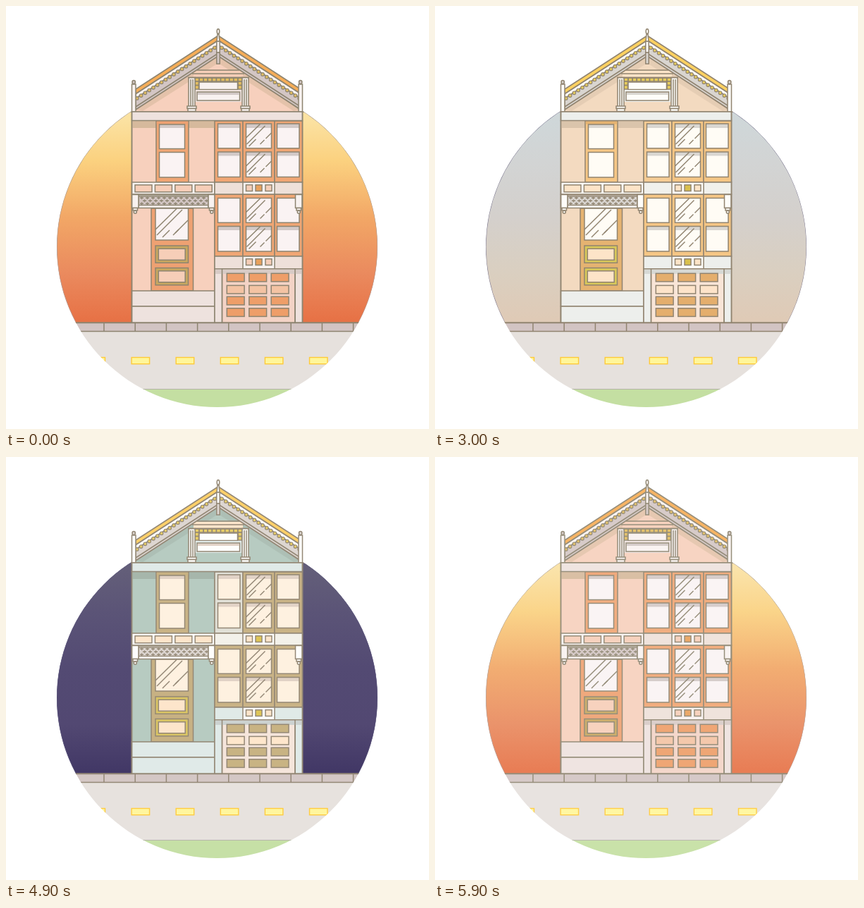
Write an HTML page with a canvas that moves like this. It is 600 px wide and 600 px high and loops after 6000 ms.

```html
<!DOCTYPE html>
<html lang="en">
<head>
<meta charset="utf-8">
<title>House from sunset to night</title>
<style>
html, body { margin: 0; width: 100%; height: 100%; overflow: hidden; background: #fff; }
canvas { display: block; width: 600px; height: 600px; }
</style>
</head>
<body>
<canvas width="600" height="600"></canvas>
<script>
const ctx = document.querySelector('canvas').getContext('2d');

// Each entry: sunset, day, night.
const palette = {
  sky0: ['fbe2a2', 'dde6e5', '555071'],
  sky1: ['fbd17f', 'e1e4df', '4c4670'],
  sky2: ['f2a766', 'e4e0d6', '443d6d'],
  sky3: ['ea8a5e', 'ebdfc9', '433c6c'],
  sky4: ['e77246', 'f2dbbf', '322c61'],
  rim: ['a8a0a0', '8f8ba0', '544f78'],
  line: ['8d8470', '918470', '8f8370'],
  wall: ['f7d0bd', 'fadcc0', 'b1c8be'],
  wallShade: ['d6b99c', 'e0c6ab', 'a0b2a8'],
  trim: ['eee2de', 'eff0ec', 'dee9e7'],
  belt: ['eee0d9', 'f1f1ec', 'f3f1ea'],
  beltLow: ['eee0d9', 'eff0ec', 'dee9e7'],
  beltShade: ['d8cbc6', 'd9dad6', 'c9d0ce'],
  white: ['f8f2f0', 'fefdf9', 'fefefc'],
  glass: ['faf3f3', 'fffdf8', 'fef0de'],
  glassShade: ['d2c9c7', 'd8d7d2', 'e0d0c3'],
  frame: ['f0a674', 'fac885', 'c5b081'],
  frameAlt: ['f0a674', 'f8ca8c', 'dfe1da'],
  door: ['eea172', 'e9b36f', 'c3ae7e'],
  panel: ['f6ceb8', 'fde4c8', 'fde5ca'],
  gold: ['c7a75f', 'd8c858', 'd9c45d'],
  accent: ['e9a05c', 'd9c04c', 'dcc44e'],
  garage: ['f3d3c6', 'f9e5d7', 'f5e5da'],
  garagePanel: ['ee9e69', 'e7ae6b', 'c4b17f'],
  garageLight: ['f3c3a3', 'fde3c9', 'fee6cc'],
  roof: ['f6ad57', 'fdd160', 'fdd063'],
  band: ['d3c6c4', 'd9d5d0', 'dcd5d0'],
  bead: ['e2bd60', 'e6cc5c', 'e6cb60'],
  pavement: ['d2c4c3', 'd2c4c3', 'd2c5c3'],
  road: ['e6e1dd', 'e6e1dd', 'e6e1dd'],
  grass: ['c4dfa2', 'c4dfa2', 'c4dfa2'],
  curb: ['b5b3a8', 'b5b3a8', 'b5b3a8'],
  dash: ['fff69a', 'fff69a', 'fff69a'],
  dashLine: ['ffca38', 'ffca38', 'ffca38']
};
const channels = hex => [0, 2, 4].map(i => parseInt(hex.substr(i, 2), 16));
for (const name in palette) palette[name] = palette[name].map(channels);

let c = {};

// leak: share of white page showing through while both layers are translucent
function mixColors(from, to, p, leak) {
  for (const name in palette) {
    const a = palette[name][from], b = palette[name][to];
    c[name] = `rgb(${a.map((v, i) =>
      Math.round(v * (1 - p - leak) + b[i] * p + 255 * leak))})`;
  }
}

function setTime(t) {
  const step = start => Math.floor((t - start) / 100) + 1;
  if (t < 1000) mixColors(0, 0, 0, 0);
  else if (t < 3000) mixColors(0, 1, Math.min(1, step(1000) / 11), 0);
  else if (t < 4900) mixColors(1, 2, Math.min(1, step(3000) / 10), 0);
  else {
    const p = (step(4900) - 0.5) / 11.5;
    mixColors(2, 0, p, p * (1 - p));
  }
}

function fillBox(x1, y1, x2, y2, fill) {
  ctx.fillStyle = fill;
  ctx.fillRect(x1, y1, x2 - x1, y2 - y1);
}
function box(x1, y1, x2, y2, fill, stroke = c.line) {
  fillBox(x1, y1, x2, y2, fill);
  ctx.strokeStyle = stroke;
  ctx.strokeRect(x1, y1, x2 - x1, y2 - y1);
}
function path(points, fill) {
  ctx.beginPath();
  points.forEach(([x, y]) => ctx.lineTo(x, y));
  if (fill) {
    ctx.closePath();
    ctx.fillStyle = fill;
    ctx.fill();
  }
  ctx.strokeStyle = c.line;
  ctx.stroke();
}
const line = (x1, y1, x2, y2) => path([[x1, y1], [x2, y2]]);
function ball(x, y, rx, ry, fill) {
  ctx.beginPath();
  ctx.ellipse(x, y, rx, ry, 0, 0, 2 * Math.PI);
  ctx.fillStyle = fill;
  ctx.fill();
  ctx.strokeStyle = c.line;
  ctx.stroke();
}

function drawScene() {
  ctx.save();
  ctx.beginPath();
  ctx.arc(299.5, 341.5, 227.5, 0, 2 * Math.PI);
  ctx.clip();
  const sky = ctx.createLinearGradient(0, 160, 0, 445);
  [0, 0.21, 0.49, 0.77, 1].forEach((stop, i) => sky.addColorStop(stop, c['sky' + i]));
  fillBox(70, 110, 530, 450, sky);
  ctx.lineWidth = 1;
  ctx.strokeStyle = c.rim;
  ctx.beginPath();
  ctx.arc(299.5, 341.5, 227.5, Math.PI - 0.49, 0.49);
  ctx.stroke();

  fillBox(70, 450, 530, 462, c.pavement);
  fillBox(70, 462, 530, 543, c.road);
  fillBox(70, 543, 530, 570, c.grass);
  fillBox(70, 543, 530, 544, c.curb);
  ctx.lineWidth = 1.5;
  for (let i = 0; i < 9; i++) line(139 + i * 44.2, 450, 139 + i * 44.2, 461);
  line(70, 461.5, 530, 461.5);
  ctx.lineWidth = 2;
  line(70, 449.3, 530, 449.3);
  ctx.lineWidth = 1.4;
  for (let i = 0; i < 6; i++) {
    const x = 115 + i * 63.1;
    box(x, 498.5, x + 25.5, 507.7, c.dash, c.dashLine);
  }
  ctx.restore();
}

// A roof layer between two heights measured at the ridge.
function chevron(top, bottom, fill) {
  const drop = 76, l = 184, r = 418, mid = 301;
  path([[l, top + drop], [mid, top], [r, top + drop],
        [r, bottom + drop], [mid, bottom], [l, bottom + drop]], fill);
}

function drawGable() {
  path([[179, 150], [301, 68], [421, 150]], c.wall);
  ctx.save();
  ctx.globalAlpha = 0.55;
  ctx.fillStyle = c.wallShade;
  ctx.beginPath();
  [[184, 147], [301, 71], [418, 147], [408, 149], [301, 81], [194, 149]]
    .forEach(([x, y]) => ctx.lineTo(x, y));
  ctx.fill();
  ctx.restore();
  fillBox(266, 92, 336, 101, c.panel);
  line(271, 91, 331, 91);
  line(264, 96, 338, 96);

  box(268, 101.5, 335, 120, c.white);
  for (let i = 0; i < 11; i++) box(268 + i * 6.1, 102, 274 + i * 6.1, 107, c.bead);
  [268, 329].forEach(x => [107, 112.5].forEach(y => box(x, y, x + 5.5, y + 5.5, c.bead)));
  box(274, 108, 328.5, 118.5, c.white);
  fillBox(268, 119, 335, 136, c.trim);
  box(271, 122, 331.5, 134, c.white);
  fillBox(272, 123, 331, 126, c.glassShade);
  [259, 335].forEach(x => {
    box(x, 101.5, x + 9, 143, c.white);
    line(x + 3, 104, x + 3, 142);
    line(x + 6, 104, x + 6, 142);
    box(x - 2, 142, x + 11, 145.5, c.white);
    box(x - 1, 145.5, x + 10, 149.5, c.white);
  });
  line(258, 101.5, 345, 101.5);

  chevron(55, 71, c.band);
  chevron(48.5, 55, c.white);
  ctx.lineWidth = 1.1;
  for (let i = 0; i < 20; i++) {
    const dx = 5 + i * 5.8, y = 56 + dx * 0.65;
    ball(301 - dx, y, 2.3, 2.3, c.bead);
    ball(301 + dx, y, 2.3, 2.3, c.bead);
  }
  ctx.lineWidth = 1.5;
  path([[184, 143], [301, 67], [418, 143]]);
  chevron(42, 48.5, c.roof);

  [178.5, 415].forEach(x => {
    box(x, 111, x + 5.5, 150, c.white);
    ball(x + 2.7, 108, 2.2, 2.4, c.band);
  });
  box(298.8, 50, 303.2, 66, c.white);
  box(298.8, 66, 303.2, 82, c.band);
  path([[300, 40], [302, 40], [303, 50], [299, 50]], c.white);
  ball(301, 36, 1.8, 3.6, c.white);
}

function pane(x1, y1, x2, y2, shade) {
  fillBox(x1, y1, x2, y2, c.glass);
  if (shade) fillBox(x1, y1, x2, y1 + shade, c.glassShade);
  ctx.strokeStyle = c.line;
  ctx.strokeRect(x1, y1, x2 - x1, y2 - y1);
}

function glints(x, y) {
  line(x, y + 20, x + 20, y + 0.5);
  line(x + 1, y + 29, x + 27, y + 3);
  line(x + 4, y + 32, x + 14, y + 22);
  line(x + 20, y + 29, x + 26, y + 23);
  line(x + 28, y + 21, x + 36, y + 13);
}

function bracket(x) {
  box(x, 267.5, x + 9.5, 286.5, c.white);
  box(x + 1.5, 286.5, x + 8, 290, c.white);
  ball(x + 4.8, 292.2, 2, 2, c.white);
}

function drawEntrance() {
  box(178.5, 162.5, 296, 449, c.wall);
  fillBox(179, 163, 296, 173, c.wallShade);

  box(213, 163, 259, 250, c.frame);
  fillBox(213.7, 163.5, 258.3, 167.5, c.door);
  pane(217.5, 168, 253.5, 202.5, 5);
  pane(217.5, 207.5, 253.5, 243, 0);

  box(178.5, 250, 296, 267, c.white);
  for (let i = 0; i < 4; i++) box(183 + i * 28.4, 253.8, 207 + i * 28.4, 263.8, c.panel);

  box(206, 287, 265.5, 404, c.door);
  pane(212, 287, 258.5, 332, 0);
  line(212, 317, 242, 287.5);
  line(214, 325, 250, 289);
  line(222, 328, 232, 318);
  line(240, 322, 258, 304);
  line(237, 325, 245, 317);
  [340, 371.5].forEach(y => {
    box(212, y, 258.5, y + 24.3, c.gold);
    box(216.3, y + 4.3, 254.2, y + 20.3, c.panel);
  });

  box(188, 268, 287, 286.5, c.white);
  box(188, 270, 287, 282.5, c.band);
  ctx.lineWidth = 1.4;
  for (let row = 0; row < 3; row++) {
    const y = 272.2 + row * 4;
    for (let x = 190 + (row % 2) * 4; x < 284; x += 8) {
      line(x, y, x + 5, y);
      line(x + 2.5, y - 1.8, x + 2.5, y + 2);
    }
  }
  ctx.lineWidth = 1.5;
  bracket(178.5);
  bracket(287);

  box(178.5, 404, 296, 426, c.trim);
  box(178.5, 426, 296, 449, c.trim);
}

function drawBays() {
  const columns = [[296, 336], [336, 381], [381, 420.5]];
  const panes = [[300.5, 332], [340.5, 376.5], [384.5, 416]];
  [[163, 250, 167, 207], [267, 355, 272.5, 312.5]].forEach(([top, bottom, row1, row2], level) => {
    columns.forEach(([x1, x2], i) => {
      box(x1, top, x2, bottom, level === 0 && i === 0 ? c.frameAlt : c.frame);
      const [p1, p2] = panes[i];
      pane(p1, row1, p2, row1 + 34.8, level ? 0 : 6);
      pane(p1, row2, p2, row2 + 35.5, 5.5);
      if (i === 1) {
        glints(p1, row1);
        glints(p1, row2);
      }
    });
  });

  [[250, 267, c.belt], [355, 373, c.beltLow]].forEach(([top, bottom, fill]) => {
    box(296, top, 420.5, bottom, fill);
    box(336, top, 381, bottom, c.white);
    [340.5, 354, 368].forEach((x, i) =>
      box(x, top + 3.7, x + 9, top + 12.5, i === 1 ? c.accent : c.panel));
  });
  bracket(410.5);

  box(296, 373, 420.5, 449, c.trim);
  box(306.5, 373, 410, 449, c.garage);
  fillBox(297, 373.7, 420, 380, c.beltShade);
  line(306.5, 373, 306.5, 449);
  line(410, 373, 410, 449);
  [379.3, 396.4, 412.3, 428.8].forEach((y, row) =>
    [313.3, 344.8, 376.2].forEach(x =>
      box(x, y, x + 24.8, y + 11.6, row === 1 ? c.garageLight : c.garagePanel)));
}

function render(now) {
  setTime(now % 6000);
  ctx.clearRect(0, 0, 600, 600);
  drawScene();
  ctx.lineWidth = 1.5;
  drawGable();
  drawEntrance();
  drawBays();
  box(178.5, 150, 420.5, 162.5, c.trim);
  line(178.5, 150, 178.5, 449);
  line(420.5, 150, 420.5, 449);
  requestAnimationFrame(() => render(performance.now() - start));
}
const start = performance.now();
render(0);
</script>
</body>
</html>
```
